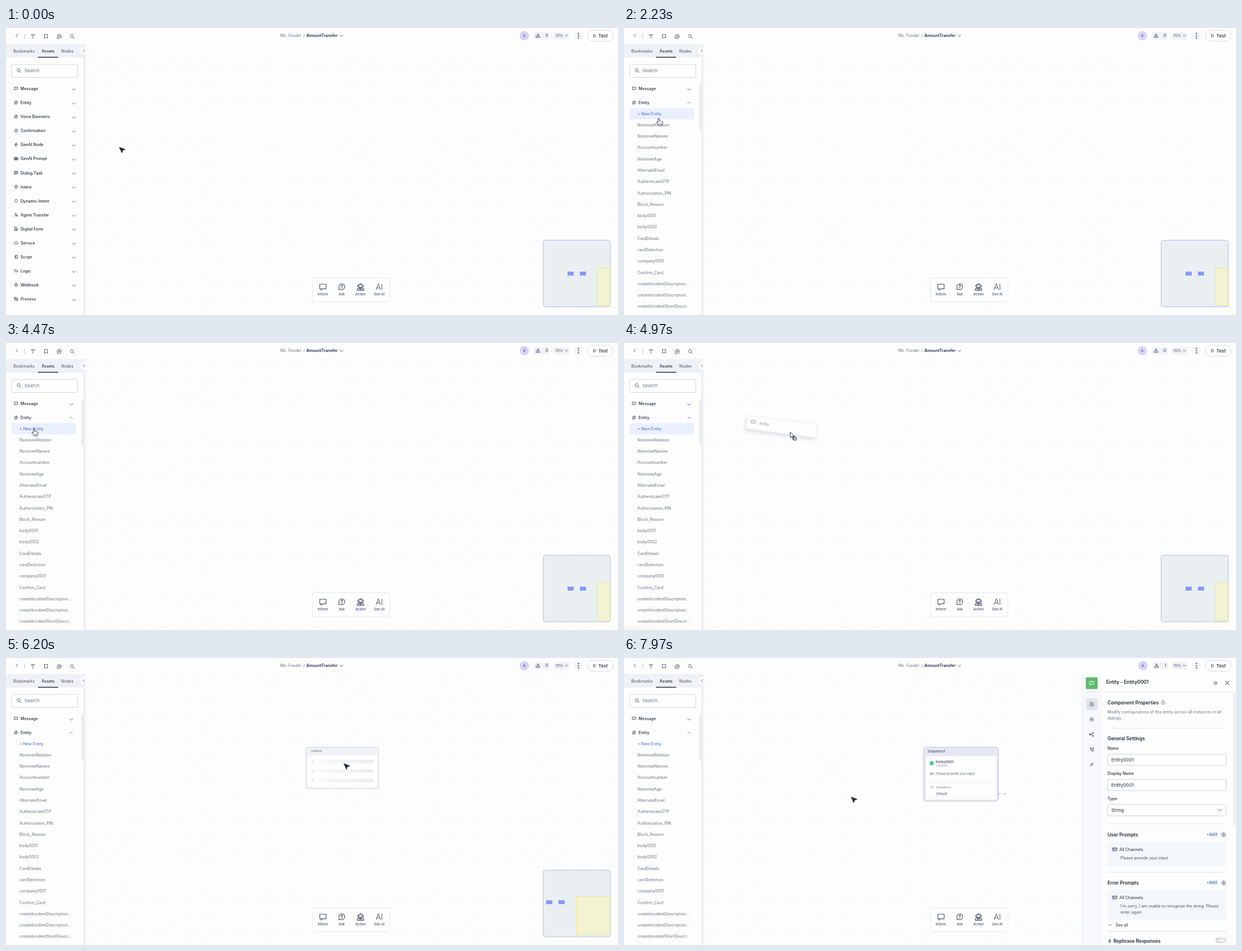
Animation of 1091 by 513 pixels, one loop 8 s. Source, as an HTML page:

```html
<!DOCTYPE html>
<html lang="en">
<head>
<meta charset="utf-8">
<title>Flow editor</title>
<style>
html, body { margin: 0; width: 100%; height: 100%; overflow: hidden; background: #fdfdfd; }
svg { display: block; width: 100vw; height: 100vh; font-family: Inter, sans-serif; }
text { white-space: pre; }
</style>
</head>
<body>
<svg id="stage" viewBox="0 0 1091 513" xmlns="http://www.w3.org/2000/svg"></svg>
<script>
const INK = '#22263a', GREY = '#6a7083', BLUE = '#3f6bd0', LINE = '#e3e5eb', ICON = '#474c66';

// Icon outlines on a 24 unit grid
const ICONS = {
  message: 'M3 4h18v13H11l-4 4v-4H3z',
  ask: 'M12 3a9 9 0 1 1-4 17l-5 1 1-5A9 9 0 0 1 12 3M9.5 9.5a2.5 2.5 0 1 1 3.5 2.3c-.7.4-1 .8-1 1.7M12 16v1',
  check: 'M12 3a9 9 0 1 0 .1 0M8 12l3 3 5-6',
  bolt: 'M13 2L4 14h7l-1 8 9-12h-7z',
  prompt: 'M2 5h20v14H2zM2 12h20M9 5v14M15 5v14',
  dialog: 'M3 4h18v14H8l-5 4zM8 9h8M8 13h5',
  intent: 'M12 5a7 7 0 1 0 .1 0M12 1v5M12 18v5M1 12h5M18 12h5',
  dynamic: 'M9 4a9 9 0 0 1 6 0M18 6a9 9 0 0 1 2 4M20 14a9 9 0 0 1-3 5M14 21a9 9 0 0 1-5-1M6 18a9 9 0 0 1-2-4M4 10a9 9 0 0 1 2-4',
  agent: 'M10 3a4 4 0 1 0 .1 0M2 21a8 8 0 0 1 12-6M18 14v8M14 18h8',
  doc: 'M5 2h9l5 5v15H5zM9 12h6M9 17h6',
  cloud: 'M7 19a5 5 0 0 1 0-10 6 6 0 0 1 11 1 4.5 4.5 0 0 1 0 9z',
  script: 'M7 8V3h13v18H7v-5M2 12h10M9 9l3 3-3 3',
  logic: 'M6 20V5M3 8l3-3 3 3M18 4v15M15 16l3 3 3-3',
  process: 'M3 3h7v7H3zM14 14h7v7h-7zM14 6h6v5M10 18H4v-5',
  chevron: 'M4 8l8 8 8-8',
  left: 'M16 4l-8 8 8 8',
  search: 'M10.5 3a7.5 7.5 0 1 0 .1 0M16 16l6 6',
  type: 'M4 7V4h16v3M12 4v17',
  bookmark: 'M5 3h14v18l-7-5-7 5z',
  chat: 'M12 3a9 9 0 1 1-4 17l-5 1 1-5A9 9 0 0 1 12 3M9 9v6M12 12h4M15 9v6',
  warn: 'M12 3l10 18H2zM12 10v5M12 17v1',
  play: 'M6 3l13 9-13 9z',
  robot: 'M12 1v4M6 5h12v9H6zM3 8v4M21 8v4M9.5 9v1M14.5 9v1M2 23v-2a4 4 0 0 1 4-4h12a4 4 0 0 1 4 4v2zM9 20h6',
  gear: 'M9 2h6l1 3 3 1 3 3-1 3 1 3-3 4-3 0-1 3H9l-1-3H5l-3-4 1-3-1-3 3-3 3-1zM12 9a3 3 0 1 0 .1 0',
  plus: 'M12 3a9 9 0 1 0 .1 0M8 12h8M12 8v8',
  share: 'M3 12h6l8-7M9 12l8 7M17 2h4v5h-4zM17 17h4v5h-4zM2 9h5v6H2z',
  phone: 'M5 3h4l2 6-3 2a12 12 0 0 0 5 6l3-3 5 3v4C12 22 4 13 5 3M15 3l6 6M21 3v6h-6',
  plug: 'M3 21l5-5M7 11l6 6 4-3-7-7zM12 7l4-4M17 12l4-4',
  card: 'M2 5h20v14H2zM2 10h20M6 15h6',
  info: 'M12 2a10 10 0 1 0 .1 0M12 11v6M12 7v1',
  shrink: 'M9 3v6H3M15 3v6h6M9 21v-6H3M15 21v-6h6',
  close: 'M3 3l18 18M21 3L3 21'
};

const icon = (name, cx, cy, size, color = ICON, width = .9) =>
  `<path d="${ICONS[name]}" transform="translate(${cx - size / 2} ${cy - size / 2}) scale(${size / 24})" fill="none" stroke="${color}" stroke-width="${width * 24 / size}" stroke-linejoin="round" stroke-linecap="round"/>`;
const text = (x, y, str, size = 7.15, weight = 400, fill = INK, more = '') =>
  `<text x="${x}" y="${y}" font-size="${size}" font-weight="${weight}" fill="${fill}" ${more}>${str}</text>`;
const rect = (x, y, w, h, fill, r = 0, stroke = 'none', more = '') =>
  `<rect x="${x}" y="${y}" width="${w}" height="${h}" rx="${r}" fill="${fill}" stroke="${stroke}" stroke-width=".8" ${more}/>`;
const rule = (x1, y, x2, color = LINE, more = '') =>
  `<path d="M${x1} ${y}H${x2}" stroke="${color}" stroke-width=".8" ${more}/>`;
const group = (id, content, more = '') => `<g id="${id}" ${more}>${content}</g>`;

const ROW_TOP = 108.6, ROW_STEP = 25.07, SUB_TOP = 153, SUB_STEP = 20.28, PUSH = 390;
const assets = [
  ['Message', 'message'], ['Entity', 'ask'], ['Voice Biometric', 'ask'], ['Confirmation', 'check'],
  ['GenAI Node', 'bolt'], ['GenAI Prompt', 'prompt'], ['Dialog Task', 'dialog'], ['Intent', 'intent'],
  ['Dynamic Intent', 'dynamic'], ['Agent Transfer', 'agent'], ['Digital Form', 'doc'], ['Service', 'cloud'],
  ['Script', 'script'], ['Logic', 'logic'], ['Webhook', 'intent'], ['Process', 'process']
];
const entities = ['+ New Entity', 'NomineeRelation', 'NomineeNamee', 'Accountnumber', 'NomineeAge',
  'AlternateEmail', 'AuthenticateOTP', 'Authorization_PIN', 'Block_Reason', 'body0001', 'body0002',
  'CardDetails', 'cardSelection', 'company0001', 'Confirm_Card', 'createIncidentDescription...',
  'createIncidentDescription...', 'createIncidentShortDescri...'];

const assetRow = ([name, glyph], i) => {
  const y = ROW_TOP + i * ROW_STEP;
  return icon(glyph, 18, y - .4, 7.4, INK, .8) + text(26, y + 2.5, name, 7.1, 500) +
    (i === 1 ? '' : `<g class="arrow">${icon('chevron', 120.8, y + 1.2, 9, ICON, .8)}</g>`);
};

const defs = `<defs>
  <pattern id="dots" x="143" y="36" width="8.4" height="8.4" patternUnits="userSpaceOnUse"><circle cx="1" cy="1" r=".75" fill="#ebecf0"/></pattern>
  <linearGradient id="edge"><stop stop-color="#e6e8ee"/><stop offset="1" stop-color="#f8f8fa" stop-opacity="0"/></linearGradient>
  <linearGradient id="bone"><stop stop-color="#f8f8f9"/><stop offset="1" stop-color="#ededf0"/></linearGradient>
  <clipPath id="subClip"><rect id="subWindow" x="0" y="143" width="138" height="0"/></clipPath>
  <filter id="soft" x="-20%" y="-60%" width="140%" height="260%"><feDropShadow dx="-1" dy="4" stdDeviation="3" flood-color="#555b70" flood-opacity=".22"/></filter>
</defs>`;

const header = rect(0, 0, 1091, 28.5, '#fdfdfd') +
  icon('left', 19, 13.5, 8) + '<path d="M33.5 10v10" stroke="#c9ccd6"/>' +
  icon('type', 48, 15, 9) + icon('bookmark', 71.5, 15, 9) + icon('chat', 95, 15, 10) + icon('search', 118, 15, 9) +
  text(489, 16, 'Ms. Fondel', 7.15, 400, GREY) + text(530, 16, '/', 7.15, 400, GREY) +
  text(535.6, 16, 'AmountTransfer', 7.05, 600) + icon('chevron', 598, 14, 8) +
  group('status', '<circle cx="924" cy="13.8" r="8.3" fill="#d9d3f8"/>' +
    text(924, 16, 'A', 6, 500, '#4b4a78', 'text-anchor="middle"') +
    rect(941, 7.5, 28, 13, '#f1f2f5', 3) + icon('warn', 948.5, 13.5, 8.5) +
    text(964, 16, '0', 7, 500, ICON, 'text-anchor="middle" id="warnings"')) +
  rect(977, 7.5, 27, 13, '#f1f2f5', 3) + text(979, 16, '70%', 6.6, 400, ICON) + icon('chevron', 999, 13.5, 7) +
  rect(1013.5, 7, 14, 14, '#f3f4f6', 3) +
  [9.8, 13.8, 17.8].map(y => `<circle cx="1020.5" cy="${y}" r="1.05" fill="${INK}"/>`).join('') +
  rect(1036.5, 4, 46, 19.5, '#fefefe', 9.5, '#cfd2da') + icon('play', 1049.5, 13.8, 7) + text(1056, 17, 'Test', 8.2, 500);

const sidebar = rect(0, 28.5, 138, 485, '#fdfdfd') + rect(138, 28.5, 8, 485, 'url(#edge)') +
  rect(0, 28.5, 138, 24.5, '#eef1f5') +
  text(13, 43.6, 'Bookmarks', 7.15, 400, ICON) + text(63.5, 43.6, 'Assets', 7.15, 500) + text(98.5, 43.6, 'Nodes', 7.15, 400, ICON) +
  rect(57, 51.5, 36, 1.7, '#3a3f55') +
  '<circle cx="139" cy="40.8" r="7" fill="#fefefe" stroke="#eceef2" stroke-width=".6"/>' + icon('left', 138.8, 40.8, 7) +
  rect(10, 65, 118, 23.5, '#fefefe', 3, '#c9ccd3') + icon('search', 23, 76, 9) + text(32.7, 79.2, 'Search', 8.2, 400, GREY) +
  rect(10, 0, 115, 20, '#eaf0fd', 0, 'none', 'id="hover"') +
  assets.slice(0, 2).map(assetRow).join('') +
  group('entityArrow', icon('chevron', 0, 0, 9, ICON, .8)) +
  group('lower', assets.slice(2).map((a, i) => assetRow(a, i + 2)).join('')) +
  group('sub', rect(10, 0, 115, 20.3, '#eaf0fd', 0, 'none', 'id="subHover"') +
    entities.map((name, i) => text(24, SUB_TOP + i * SUB_STEP + 2.6, name, 7.1, 400, i ? GREY : BLUE)).join(''),
    'clip-path="url(#subClip)"') +
  rect(134, 100, 4, 84, '#ededef', 2, 'none', 'id="scrollbar"');

const toolbar = rect(546, 446.5, 138.5, 42.5, '#fdfdfe', 4, '#dfe1e9') +
  icon('message', 565, 463, 15, ICON, 1.1) + icon('ask', 598.5, 462.5, 14, ICON, 1.1) + icon('robot', 632, 462.5, 14, ICON, 1.1) +
  text(665.5, 467.5, 'AI', 14, 300, ICON, 'text-anchor="middle"') +
  ['Inform', 'Ask', 'Action', 'Gen AI'].map((s, i) =>
    text(565 + i * 33.5, 477.8, s, 5.95, 500, ICON, 'text-anchor="middle"')).join('');

const minimap = rect(957.5, 379.3, 119.7, 119, '#eaeff2', 4, '#a3b0ec') +
  group('blocks', rect(1001, 435.5, 11, 7, '#8499f5') + rect(1023, 435.5, 11, 7, '#8499f5')) +
  rect(1054, 428.5, 23, 68, '#f2f3d0', 0, '#f2d94a', 'stroke-dasharray="2 1" id="view"');

const loadingCard = rect(534, 159.3, 130.5, 74.5, '#f0f1f4', 3, '#d2d5dd') + text(543, 168.3, 'Untitled', 5.4, 400, GREY) +
  rect(537.5, 174, 124, 56.5, '#fdfdfd', 3) +
  [185, 202, 219].map(y => rect(544, y - 3, 6.5, 6, '#f1f1f3', 2) + rect(557, y - 3, 98, 6, 'url(#bone)', 1)).join('');

const sequenceCard = rect(534, 159.5, 133.5, 96.5, '#e7e8f3', 5, '#b5b8d6') + text(541, 169, 'Sequence1', 6, 600, '#5b5f78') +
  rect(538, 175.5, 126, 77.5, '#fdfdfe', 3) +
  '<circle cx="548.8" cy="188" r="3.4" fill="#43c58c"/><path d="M545.4 188v3.4h3.4z" fill="#43c58c"/>' +
  text(556, 187.6, 'Entity0001', 6.05, 600, '#54586b') + text(556, 194.3, 'entity0001', 4.2, 400, '#8a8fa0') +
  icon('card', 548.8, 207, 6.5, '#8a8fa0', .7) + text(556, 209.2, 'Please provide your input', 5.8, 400, '#666b7e') +
  rule(545, 222.5, 656, '#d5d7e2', 'stroke-dasharray="2 1.5"') +
  icon('logic', 548.8, 230.5, 5, '#8a8fa0', .6) + text(556, 232.5, 'Transitions', 5.1, 500, '#8a8fa0') +
  text(557, 245, 'Default', 5.6, 400, '#54586b') +
  rule(668, 242.7, 679, '#e4e5ee') + '<circle cx="668" cy="242.7" r="1.5" fill="#b5b8d6"/><circle cx="679" cy="242.7" r="1.5" fill="#b9bcc6"/>';

const field = (y, label, value) => text(862, y - 18.5, label, 7.15, 500) +
  rect(862.3, y - 10, 211, 20, '#fefefe', 2, '#bfc4cb') + text(868.7, y + 2.9, value, 8);
const promptBox = (y, height, title, lines) =>
  text(862, y - 9.5, title, 8.3, 600) + text(1038.5, y - 9.7, '+Add', 7.4, 500, BLUE) + icon('gear', 1069, y - 12, 8) +
  rect(862, y, 212, height, '#f4f7fa', 2) + icon('card', 875, y + 14, 9) + text(883.3, y + 16.5, 'All Channels', 7.2) +
  lines.map((s, i) => text(885, y + 32.2 + i * 11, s, 7.05, 400, ICON)).join('');

const panel = rect(817, 28.5, 34, 485, '#f7f8fc') + rect(851, 28.5, 240, 485, '#fdfdfd') +
  '<path d="M817 28.5V513" stroke="#e6e8ef" stroke-width=".8"/>' +
  rect(823.3, 34.5, 21, 21, '#5fb76c', 2) + icon('message', 833.8, 45.2, 10, '#fff') + text(833.8, 46.2, '?', 5, 600, '#fff', 'text-anchor="middle"') +
  rule(824, 61, 844) + rect(823.3, 72, 21, 21.5, '#e2e5eb', 2) +
  ['gear', 'plus', 'share', 'phone', 'plug'].map((name, i) => icon(name, 833.8, 82.8 + i * 26.9, 8.5)).join('') +
  text(859.5, 45.5, 'Entity - Entity0001', 8.45, 600) + icon('shrink', 1054.5, 45, 7.5) + icon('close', 1075.5, 44.5, 9, INK, 1) +
  rule(851, 61.5, 1091) + rect(1086, 62, 4, 238, '#ebecef', 2) +
  text(862, 82.8, 'Component Properties', 8.4, 600) + icon('info', 961, 79.5, 8, ICON, .7) +
  text(862, 99.3, 'Modify configurations of this entity across all instances in all', 7.1, 400, GREY) +
  text(862, 110.2, 'dialogs.', 7.1, 400, GREY) +
  rule(862, 125.5, 1074) + text(862, 147, 'General Settings', 8.3, 600) +
  field(182, 'Name', 'Entity0001') + field(227, 'Display Name', 'Entity0001') + field(272, 'Type', 'String') +
  icon('chevron', 1062, 272, 10) + rule(862, 296.5, 1074) +
  promptBox(328, 45, 'User Prompts', ['Please provide your input']) + rule(862, 383, 1074, '#d5d8df') +
  promptBox(414, 54, 'Error Prompts', ["I'm sorry, I am unable to recognize the string. Please", 'enter again.']) +
  icon('chevron', 866.5, 477.5, 6) + text(876.3, 480, 'See all', 7.1) + rule(862, 488.5, 1074, '#d5d8df') +
  icon('bolt', 866, 506, 8) + text(872.5, 509.3, 'Rephrase Responses', 8.3, 600) +
  rect(1055, 501, 18, 7.5, '#f0f1f4', 3.7, '#a5a9b7') + '<circle cx="1059" cy="504.8" r="2.6" fill="#fff" stroke="#a5a9b7" stroke-width=".7"/>';

const dragCard = '<g transform="translate(-76 -30) rotate(7.4)" filter="url(#soft)" opacity=".85">' +
  rect(0, 0, 125, 24, '#fdfdfe', 1, '#e7e8ec') + icon('message', 11.5, 10.5, 9, GREY, .8) +
  text(11.5, 12, '?', 5, 400, GREY, 'text-anchor="middle"') + text(23, 13.6, 'Entity', 6.3, 400, GREY) + '</g>';
const cursors =
  group('arrow', '<path d="M0 0L10.5 4 6.2 5.6 4.6 10.3z" fill="#23283f" stroke="#23283f" stroke-width=".8" stroke-linejoin="round"/>') +
  group('hand', '<path d="M-1.2 1Q0-.6 1.2 1V5Q2.6 4.3 3.4 5.4 4.8 4.8 5.4 6 7 5.6 7 7V9.5Q6.8 11.5 5.5 13H0Q-1.5 10-4 7.5-3.2 6-1.2 7.8z" fill="#fff" stroke="#23283f" stroke-width=".9" stroke-linejoin="round"/><path d="M1.2 9v2.5M3 9v2.5M4.8 9v2.5" stroke="#23283f" stroke-width=".6"/>') +
  group('drag', dragCard + '<path d="M0 0V10L2.4 8 4 11.5 5.6 10.8 4 7.4H7.2z" fill="#fff" stroke="#23283f" stroke-width=".9"/>' +
    rect(4.5, 8.5, 4.5, 5, '#fff', 0, INK) + rect(6, 10, 4.8, 4.8, '#fff', 0, INK) + '<path d="M7 12.4h2.8M8.4 11v2.8" stroke="#23283f" stroke-width=".6"/>');

document.getElementById('stage').innerHTML = defs + rect(0, 0, 1091, 513, '#fdfdfd') +
  rect(143, 29, 948, 484, 'url(#dots)') + group('loading', loadingCard) + group('sequence', sequenceCard) +
  toolbar + minimap + sidebar + group('panel', panel) + header +
  '<path id="peek" d="M0 504.5L20 505.5 88 513H0z" fill="#f8f8ef"/>' + group('pointer', cursors);

const el = id => document.getElementById(id);
const show = (id, on) => el(id).setAttribute('display', on ? 'inline' : 'none');
const set = (id, attrs) => Object.entries(attrs).forEach(([k, v]) => el(id).setAttribute(k, v));
const clamp = v => Math.max(0, Math.min(1, v));
const linear = u => u, smooth = u => u * u * (3 - 2 * u), easeOut = u => 1 - (1 - u) ** 2;

// Pointer tip: time, x, y, easing of the way there
const path = [
  [0, 202, 213], [400, 202, 213], [900, 117, 140, smooth], [1200, 119, 134, smooth], [1600, 119, 134],
  [2230, 62, 161, smooth], [2600, 61, 197, smooth], [3370, 61, 197], [3700, 50, 153, smooth], [4500, 50, 153],
  [5270, 453, 163, linear], [5470, 518, 166, linear], [5800, 605, 188, easeOut], [6150, 605, 188],
  [6900, 405, 248, smooth], [8000, 405, 248.5]
];
function pointerAt(t) {
  const i = Math.max(1, path.findIndex(key => key[0] > t));
  const [t0, x0, y0] = path[i - 1], [t1, x1, y1, ease = linear] = path[i];
  const u = ease((t - t0) / (t1 - t0));
  return [x0 + (x1 - x0) * u, y0 + (y1 - y0) * u];
}

const OPEN = 1300, GRAB = 4560, DROP = 5950, READY = 7400;
const arrows = document.querySelectorAll('.arrow');

function render(t) {
  const [x, y] = pointerAt(t);
  const open = t >= OPEN, dragging = t >= GRAB && t < DROP, dropped = t >= DROP, ready = t >= READY;
  const inList = x < 129 && !dragging && !dropped;

  set('pointer', { transform: `translate(${x} ${y})` });
  show('hand', inList);
  show('drag', dragging);
  show('arrow', !inList && !dragging);
  show('peek', dragging);

  const spread = easeOut(clamp((t - OPEN) / 250));
  set('subWindow', { height: PUSH * spread });
  set('lower', { transform: `translate(0 ${PUSH * spread})` });
  arrows.forEach(a => a.setAttribute('transform', `translate(${open ? -4.4 : 0} 0)`));
  set('entityArrow', { transform: open ? 'translate(116 133.6) scale(.85 -.85)' : 'translate(120.8 134.9)' });
  show('scrollbar', open);

  const row = Math.round((y - ROW_TOP) / ROW_STEP);
  show('hover', inList && (!open || y < 143));
  set('hover', { y: ROW_TOP + row * ROW_STEP - 8.7, height: 18, width: open ? 115 : 119, fill: '#f4f5f8' });
  const held = t >= GRAB && t < 6170;
  const sub = held ? 0 : Math.round((y - SUB_TOP) / SUB_STEP);
  show('subHover', open && (held || inList && y >= 143));
  set('subHover', { y: SUB_TOP + sub * SUB_STEP - 10 });

  show('loading', dropped && !ready);
  show('sequence', ready);
  set('blocks', { transform: dropped ? 'translate(-38 -2.5)' : '' });
  set('view', dropped ? { x: 1016.5, width: 60.5, y: 426.5 } : { x: 1054, width: 23, y: 428.5 });

  show('panel', ready);
  set('panel', { transform: `translate(${274 * (1 - easeOut(clamp((t - READY) / 200)))} 0)` });
  set('status', { transform: `translate(${ready ? 1 : 0} 0)` });
  el('warnings').textContent = ready ? 1 : 0;
}

function tick() {
  render(performance.now() % 8000);
  requestAnimationFrame(tick);
}
tick();
</script>
</body>
</html>
```
